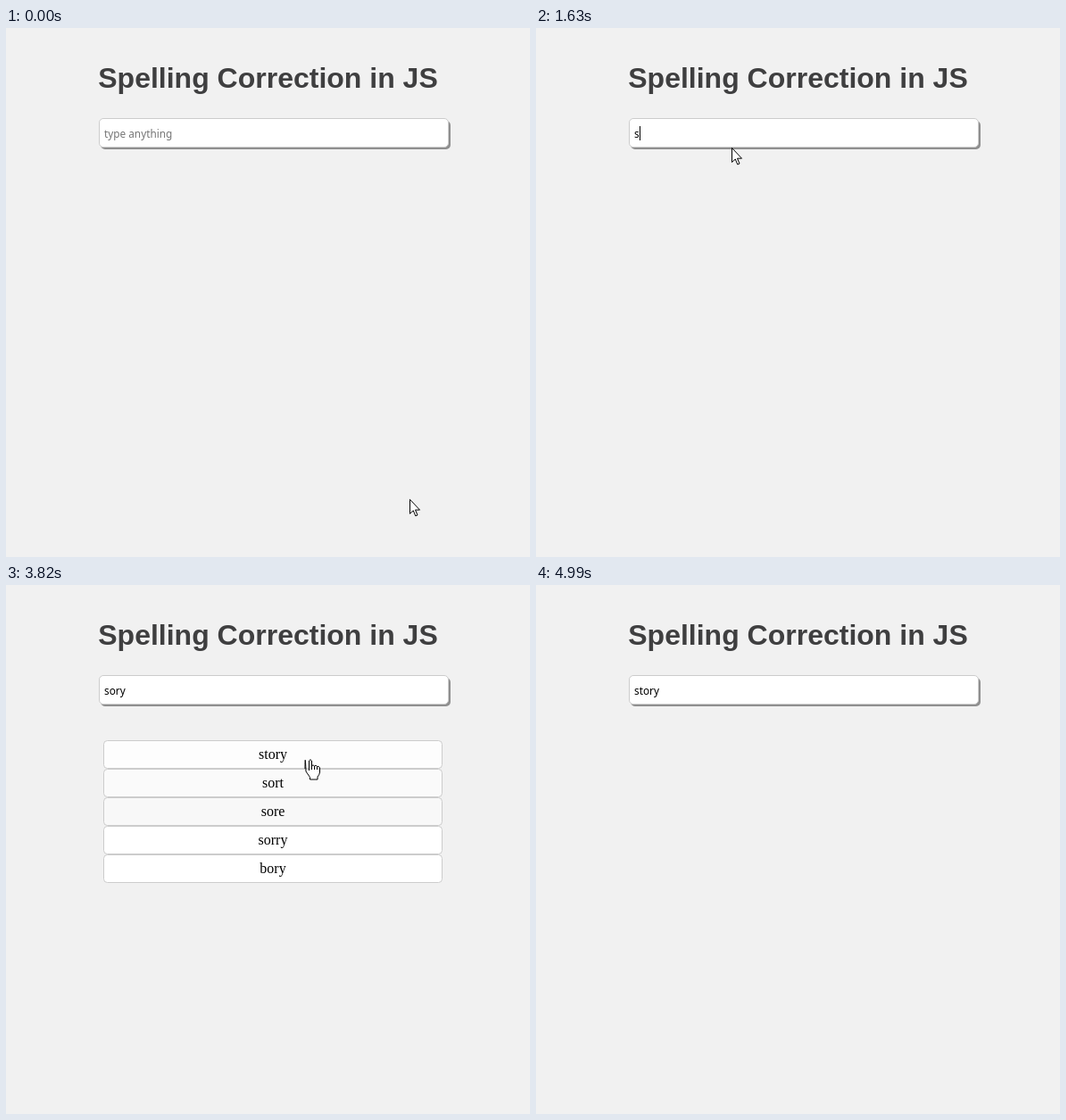
Write an HTML page that moves like this. It is 587 px wide and 593 px high and loops after 6.39 s.

```html
<!DOCTYPE html>
<html lang="en">
<head>
<meta charset="utf-8">
<title>Spelling Correction in JS</title>
<style>
  html, body { margin: 0; width: 100%; height: 100%; overflow: hidden; background: #f1f1f1; }
  svg { display: block; }
  h1, .title { font: bold 32px "Liberation Sans", Arial, sans-serif; fill: #3f3f40; text-anchor: middle; }
  #typed { font: 11.8px "Noto Sans", Tahoma, sans-serif; }
  #list text { font: 16px "Liberation Serif", "Times New Roman", serif; text-anchor: middle; }
  .box { fill: #fff; stroke: #ccc; }
  #pointer path { stroke: #000; fill: #fff; }
  #pointer .beam { fill: none; }
</style>
</head>
<body>
<svg width="587" height="593" viewBox="0 0 587 593">
  <text class="title" x="293.5" y="67">Spelling Correction in JS</text>
  <rect x="106" y="104" width="392" height="32" rx="5" fill="#8f8f8f"/>
  <rect class="box" x="104.5" y="101.5" width="391" height="32" rx="4.5"/>
  <text id="typed" x="110" y="123"></text>
  <rect id="caret" y="110" width="1" height="16"/>
  <g id="list"></g>
  <g id="pointer">
    <path class="arrow" d="M.5.5V16.5L4.3 13 6.8 19 9 18 6.5 12.2H11.5Z"/>
    <path class="beam" d="M-3-7.5H0M1-7.5H4M.5-7V7M-3 7.5H0M1 7.5H4"/>
    <path class="hand" d="M-1.5 13V2Q0-.7 1.5 2V8Q3 5.5 4.5 8Q6 6 7.5 8.5Q9.5 7.5 10.5 10V15Q10 18 8 20V23H-.5V20.5L-5 14Q-6-10-6 11-3.5 11Z"/>
    <path class="hand" d="M1.5 7V12M4.5 8V12M7.5 9V12"/>
  </g>
</svg>
<script>
const LOOP = 6390, STEP = 76;
const LIST_TOP = 174, ROW = 32;
const PICK = 4290, CLOSE = 4440;
const $ = id => document.getElementById(id);

// Each entry: start time, value
const typing = [[0, ""], [1630, "s"], [2010, "so"], [2180, "sor"], [2420, "sory"], [CLOSE, "story"]];
const lists = [
  [0, []],
  [2250, ["for", "or", "so", "son", "nor"]],
  [2490, ["story", "sort", "sore", "sorry", "bory"]],
  [CLOSE, []]
];
const caretOn = [[610, 1080], [1630, 2720], [3270, 3820]];

// Each leg: start time, number of steps, end x, end y
const legs = [
  [70, 7, 223, 122], [760, 2, 219, 134], [3350, 4, 333, 268],
  [3667, 3, 341, 195], [3970, 1, 341, 192], [4760, 3, 207, 493]
];

const at = (track, t) => track.filter(([start]) => start <= t).pop()[1];
const ease = p => p * p * (3 - 2 * p);

function pointerAt(t) {
  let x = 452, y = 528;
  for (const [start, steps, endX, endY] of legs) {
    if (t < start) break;
    const p = ease(Math.min(1, (Math.floor((t - start) / STEP) + 1) / steps));
    x += (endX - x) * p;
    y += (endY - y) * p;
  }
  return { x: Math.round(x), y: Math.round(y) };
}

const rowAt = y => Math.floor((y - LIST_TOP) / ROW);

// Hover tint of every row, easing towards the row under the pointer
function tints(t) {
  const tint = [0, 0, 0, 0, 0];
  for (let s = 3270; s < t; s += 10) {
    const over = rowAt(pointerAt(s).y);
    tint.forEach((v, i) => tint[i] += ((i === over) - v) * 0.065);
  }
  return tint;
}

const svgNode = (tag, attrs) => {
  const node = document.createElementNS("http://www.w3.org/2000/svg", tag);
  for (const key in attrs) node.setAttribute(key, attrs[key]);
  return $("list").appendChild(node);
};
const rows = Array.from({ length: 5 }, (_, i) => {
  const y = LIST_TOP + i * ROW;
  return {
    box: svgNode("rect", { class: "box", x: 109.5, y: y + 0.5, width: 379, height: 31, rx: 4 }),
    label: svgNode("text", { x: 299, y: y + 21 })
  };
});

function drawPointer(t) {
  const { x, y } = pointerAt(t);
  const inField = x > 104 && x < 496 && y > 101 && y < 133;
  const onRow = t > 3270 && t < PICK && rowAt(y) >= 0 && rowAt(y) < 5;
  const shape = inField ? "beam" : onRow ? "hand" : "arrow";
  $("pointer").setAttribute("transform", `translate(${x} ${y})`);
  $("pointer").style.display = t < 4990 ? "" : "none";
  for (const path of $("pointer").children)
    path.style.display = path.classList.contains(shape) ? "" : "none";
}

function draw(t) {
  const text = at(typing, t), typed = $("typed");
  typed.textContent = text || "type anything";
  typed.setAttribute("fill", text ? "#000" : "#757575");
  $("caret").setAttribute("x", 110 + (text ? Math.round(typed.getComputedTextLength()) : 0));
  $("caret").style.display = caretOn.some(([a, b]) => t >= a && t < b) ? "" : "none";

  const words = at(lists, t);
  $("list").style.display = words.length ? "" : "none";
  if (words.length) {
    const tint = tints(t);
    rows.forEach(({ box, label }, i) => {
      const grey = Math.round(255 - 14 * tint[i]);
      label.textContent = words[i];
      box.style.fill = i === 0 && t >= PICK ? "#bbeebb" : `rgb(${grey},${grey},${grey})`;
    });
  }
  drawPointer(t);
}

const begin = performance.now();
(function frame() {
  draw((performance.now() - begin) % LOOP);
  requestAnimationFrame(frame);
})();
</script>
</body>
</html>
```
